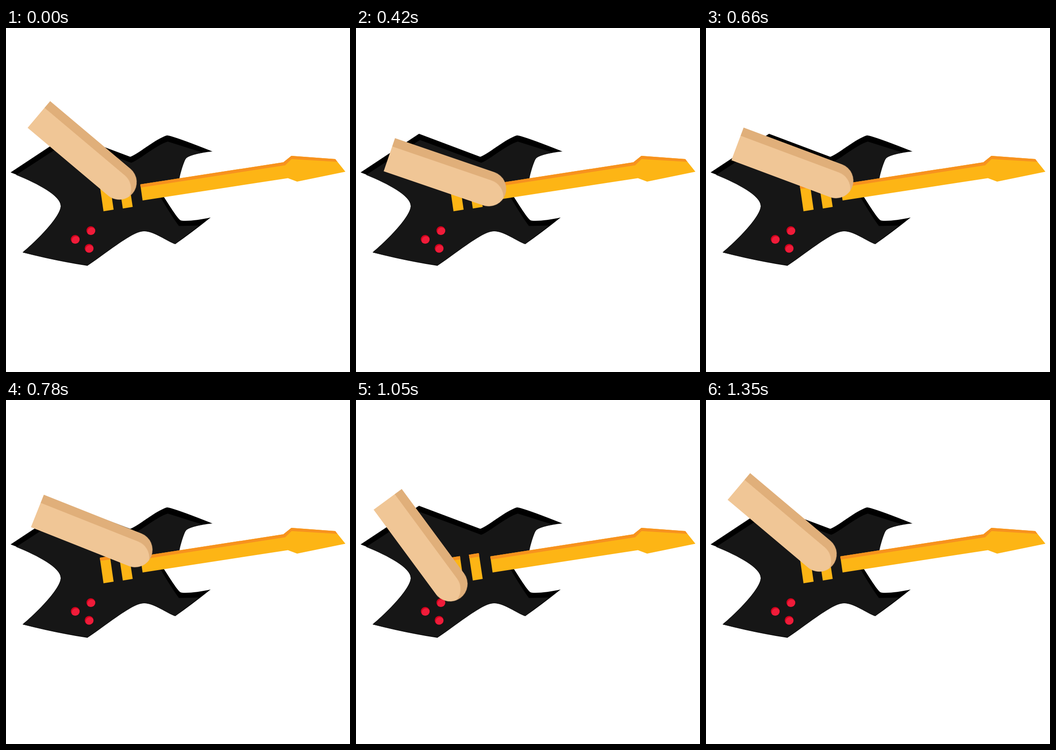
An HTML page without scripts for the animation above (1380 ms loop, 748 by 748 pixels).

```html
<!DOCTYPE html>
<html lang="en">
<head>
<meta charset="utf-8">
<title>Guitar strum</title>
<style>
  html, body { margin: 0; width: 100%; height: 100%; overflow: hidden; background: #fff; }
  svg { display: block; width: 100vw; height: 100vh; }

  .arm { animation: strum 1380ms -1ms infinite; }

  /* Moves in 30 ms ticks: each steps() count is the number of ticks to the next key. */
  @keyframes strum {
    0%      { transform: translate(71.5px, 188px) rotate(40.1deg);   animation-timing-function: steps(2); }
    4.348%  { transform: translate(72.2px, 189.5px) rotate(34deg);   animation-timing-function: steps(2); }
    8.696%  { transform: translate(73px, 206px) rotate(28deg);       animation-timing-function: steps(2); }
    13.043% { transform: translate(73.5px, 232px) rotate(23deg);     animation-timing-function: steps(2); }
    17.391% { transform: translate(73.5px, 254px) rotate(30.5deg);   animation-timing-function: steps(1); }
    19.565% { transform: translate(73.5px, 262px) rotate(39deg);     animation-timing-function: steps(1); }
    21.739% { transform: translate(73.5px, 269px) rotate(38.4deg);   animation-timing-function: steps(2); }
    26.087% { transform: translate(73.2px, 279px) rotate(27deg);     animation-timing-function: steps(2); }
    30.435% { transform: translate(72.5px, 275.5px) rotate(18.9deg); animation-timing-function: steps(8); }
    47.826% { transform: translate(68.5px, 252px) rotate(20.5deg);   animation-timing-function: steps(8); }
    65.217% { transform: translate(68px, 230.5px) rotate(22.8deg);   animation-timing-function: steps(3); }
    71.739% { transform: translate(68.3px, 222px) rotate(23.7deg);   animation-timing-function: steps(3); }
    78.261% { transform: translate(69.2px, 213px) rotate(68.5deg);   animation-timing-function: steps(4); }
    86.957% { transform: translate(69.5px, 198.5px) rotate(55.3deg); animation-timing-function: steps(5); }
    97.826%, 100% { transform: translate(71.5px, 188px) rotate(40.1deg); }
  }
</style>
</head>
<body>
<svg viewBox="0 0 748 748">
  <defs>
    <clipPath id="rim"><circle r="9.6"/></clipPath>
    <g id="knob" clip-path="url(#rim)">
      <circle r="10" fill="#d0021b"/>
      <circle cx="1.5" cy="2.5" r="9.2" fill="#ef1c3a"/>
    </g>
  </defs>

  <g class="body">
    <path d="M10 314 L137 230 L270 280 C285 276 325 241 350 233.5 Q365 235 449 268.500
             C430 270 399 276 392 283 S380 313 377 327 L343 367
             C355 385 370 410 378 417 C381 422 420 418 445 412 Q405 444 368 470
             C350 464 322 442 300 442 C275 442 225 485 177 517 Q110 507 36 488
             C75 455 119 408 119 387 C119 365 70 337 10 314Z"/>
    <path fill="#161616" d="M22 319.500 L139 243.500 L272 293 C287 289 327 254 352 247 L428 271
             C410 274 396 279 392 283 S380 313 377 327 L336 368
             Q360 409 376 430.500 L420 429.500 L368 469.500
             C350 464 322 441.500 300 441.500 C275 441.500 225 484 177 516 Q110 506 37 488
             C75 455 119 408 119 387 C119 365 70 339 22 319.500Z"/>
  </g>

  <g class="pickups" fill="#fdb515">
    <path d="M204 343 L226 339.500 L234 395 L212 398.500Z"/>
    <path d="M245.500 336.500 L267 333 L275.500 389 L254 392.500Z"/>
    <g fill="#f7921e">
      <path d="M204 343 L226 339.500 L227 346.500 L205 350Z"/>
      <path d="M245.500 336.500 L267 333 L268 340.500 L246.500 344Z"/>
    </g>
  </g>

  <g class="neck">
    <path fill="#fdb515" d="M292 340 L603 292 L620.500 278 L716 285 L738 312.500 L633 334 L613 326.500 L297 375Z"/>
    <path fill="#f7921e" d="M292 340 L603 292 L620.500 278 L716 285 L720.500 291 L621 285 L607 298.500 L293 347Z"/>
  </g>

  <use href="#knob" x="150.500" y="459.500"/>
  <use href="#knob" x="184.500" y="440.500"/>
  <use href="#knob" x="180.700" y="479"/>

  <g class="arm">
    <path fill="#e0af7a" d="M0 -38 H228.500 A38 38 0 0 1 228.500 38 H0Z"/>
    <path fill="#f0c696" d="M0 -19 H228.500 A38 38 0 0 1 265.300 9.500 A38 38 0 0 1 228.500 38 H0Z"/>
  </g>
</svg>
</body>
</html>
```
